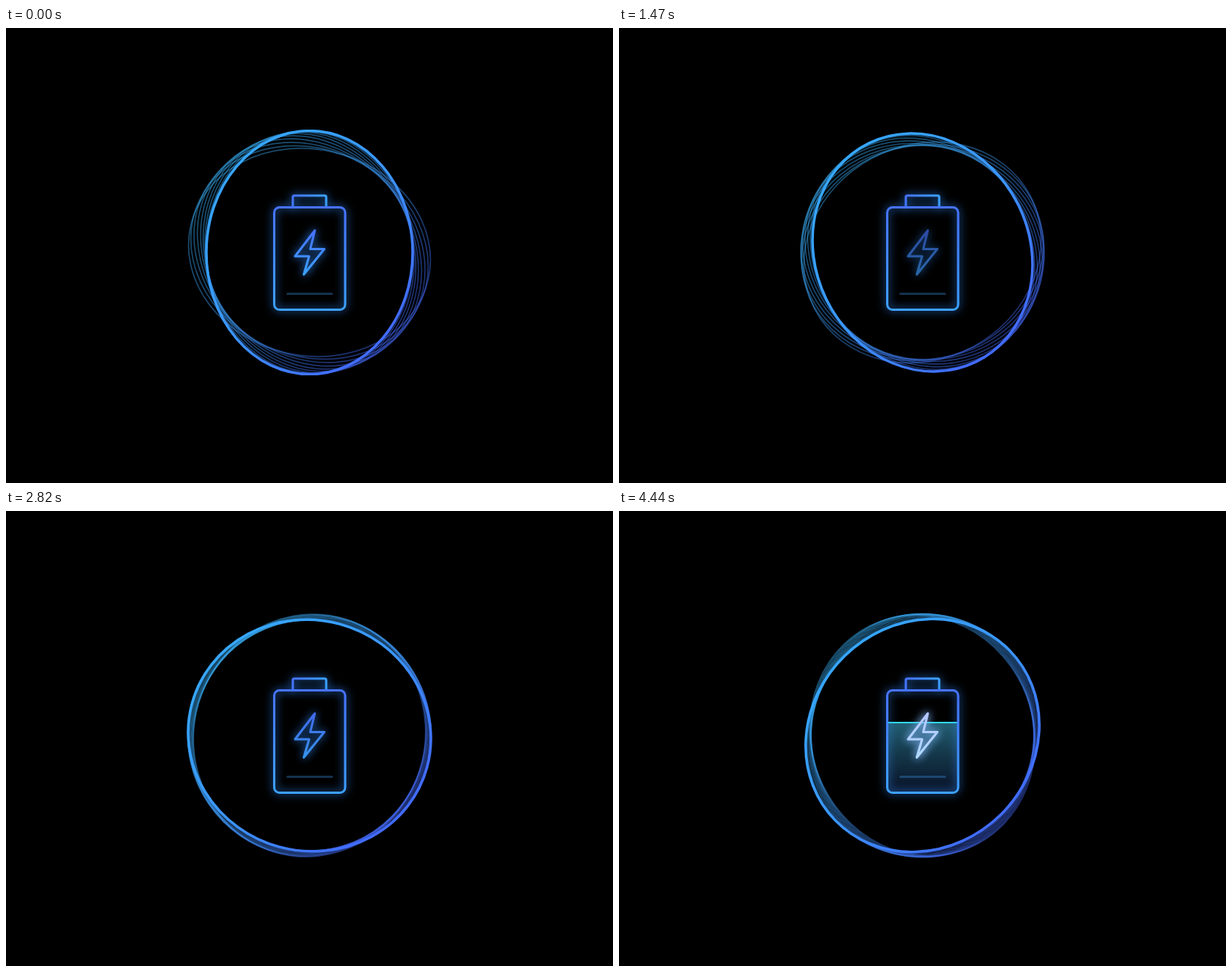
Recreate the animation shown at these times as an HTML page without scripts. Size 800 by 600 pixels, loop 4.47 s.

```html
<!DOCTYPE html>
<html lang="en">
<head>
<meta charset="utf-8">
<title>Charging battery</title>
<style>
  @property --time { syntax: "<number>"; inherits: true; initial-value: 0; }
  @property --charge { syntax: "<number>"; inherits: true; initial-value: 0; }

  html, body { margin: 0; width: 100%; height: 100%; overflow: hidden; background: #000; }

  svg {
    display: block;
    width: 800px;
    height: 600px;
    fill: none;
    stroke-linecap: round;
    stroke-linejoin: round;
    animation: clock 4470ms linear infinite, charge 4470ms linear infinite;
  }

  /* Ring time runs evenly, then slows down while the battery charges. */
  @keyframes clock {
    0% { --time: 0; }
    82.77% { --time: 3700; animation-timing-function: cubic-bezier(.33, .58, .67, .885); }
    100% { --time: 4135; }
  }
  @keyframes charge {
    0%, 80.54% { --charge: 0; }
    100% { --charge: 1; }
  }

  /* Every ring follows the same eased turn, each a little later than the last. */
  .ring {
    --phase: calc(var(--time) - var(--i) * 100);
    rx: calc(144.5px - 8.5px * cos(var(--time) * .2deg));
    ry: 160.5px;
    rotate: calc(var(--phase) * .1deg - 7.5deg * sin(var(--phase) * .2deg));
    stroke: #fff;
    stroke-width: 1.7px;
    stroke-opacity: .46;
  }
  .lead { --i: 0; stroke-width: 3.5px; stroke-opacity: 1; }

  .bolt { opacity: max(.79 + .21 * cos(var(--time) * .4deg), var(--charge) * 6); }
  .flash { opacity: min(.6, var(--charge) * 1.1); }
  .fluid { transform: translateY(calc(var(--charge) * -97px)); }
</style>
</head>
<body>
<svg viewBox="0 0 800 600">
  <defs>
    <linearGradient id="leadColor" x2="1" y2="1">
      <stop stop-color="#34afff"/>
      <stop offset=".5" stop-color="#3b96ff"/>
      <stop offset=".8" stop-color="#416eff"/>
      <stop offset="1" stop-color="#4564ff"/>
    </linearGradient>
    <linearGradient id="trailColor" x2="1" y2="1">
      <stop stop-color="#34b4ee"/>
      <stop offset=".5" stop-color="#3a90ea"/>
      <stop offset=".8" stop-color="#4068ee"/>
      <stop offset="1" stop-color="#465cee"/>
    </linearGradient>
    <linearGradient id="down" x2="0" y2="1">
      <stop stop-color="#4672ff"/>
      <stop offset="1" stop-color="#3ca0ff"/>
    </linearGradient>
    <linearGradient id="across">
      <stop stop-color="#4672ff"/>
      <stop offset="1" stop-color="#3ba2ff"/>
    </linearGradient>
    <linearGradient id="fluidColor" x2="0" y2="1">
      <stop stop-color="#235f74"/>
      <stop offset=".3" stop-color="#15384a"/>
      <stop offset=".6" stop-color="#0b192e"/>
      <stop offset="1" stop-color="#0a1428"/>
    </linearGradient>

    <filter id="blueGlow" filterUnits="userSpaceOnUse" x="310" y="180" width="180" height="240" color-interpolation-filters="sRGB">
      <feDropShadow dx="0" dy="0" stdDeviation="6" flood-color="#318cff"/>
    </filter>
    <filter id="whiteGlow" filterUnits="userSpaceOnUse" x="310" y="180" width="180" height="240" color-interpolation-filters="sRGB">
      <feDropShadow dx="0" dy="0" stdDeviation="6" flood-color="#fff"/>
    </filter>

    <mask id="leadMask" maskUnits="userSpaceOnUse" x="220" y="116" width="360" height="360" style="mask-type: alpha">
      <g transform="translate(400 296)"><ellipse class="ring lead"/></g>
    </mask>
    <mask id="trailMask" maskUnits="userSpaceOnUse" x="220" y="116" width="360" height="360" style="mask-type: alpha">
      <g transform="translate(400 296)">
        <ellipse class="ring" style="--i: 8"/>
        <ellipse class="ring" style="--i: 7"/>
        <ellipse class="ring" style="--i: 6"/>
        <ellipse class="ring" style="--i: 5"/>
        <ellipse class="ring" style="--i: 4"/>
        <ellipse class="ring" style="--i: 3"/>
        <ellipse class="ring" style="--i: 2"/>
        <ellipse class="ring" style="--i: 1"/>
      </g>
    </mask>
    <clipPath id="inside"><rect x="354" y="237" width="93" height="134" rx="6"/></clipPath>
    <path id="boltShape" d="M407 267 381 301H399.5L392.5 325 419.5 291.5H401Z"/>
  </defs>

  <rect x="238" y="134" width="324" height="324" fill="url(#trailColor)" mask="url(#trailMask)"/>
  <rect x="238" y="134" width="324" height="324" fill="url(#leadColor)" mask="url(#leadMask)"/>

  <g clip-path="url(#inside)">
    <g class="fluid">
      <rect x="354" y="372.8" width="93" height="136" fill="url(#fluidColor)"/>
      <path d="M354 372.8H447" stroke="#30d8ee" stroke-width="2"/>
    </g>
  </g>
  <path d="M371 350.5H429.5" stroke="#3a88d8" stroke-opacity=".36" stroke-width="3"/>

  <g stroke-width="3">
    <g filter="url(#blueGlow)">
      <path d="M378 236V223Q378 221 380 221H420Q422 221 422 223V236" stroke="url(#across)"/>
    </g>
    <g filter="url(#blueGlow)">
      <rect x="353.5" y="236.5" width="93.5" height="135" rx="7" stroke="url(#down)"/>
    </g>
    <g class="bolt" filter="url(#blueGlow)">
      <use href="#boltShape" stroke="url(#down)"/>
    </g>
    <g class="flash" filter="url(#whiteGlow)">
      <use href="#boltShape" stroke="#fff"/>
    </g>
  </g>
</svg>
</body>
</html>
```
